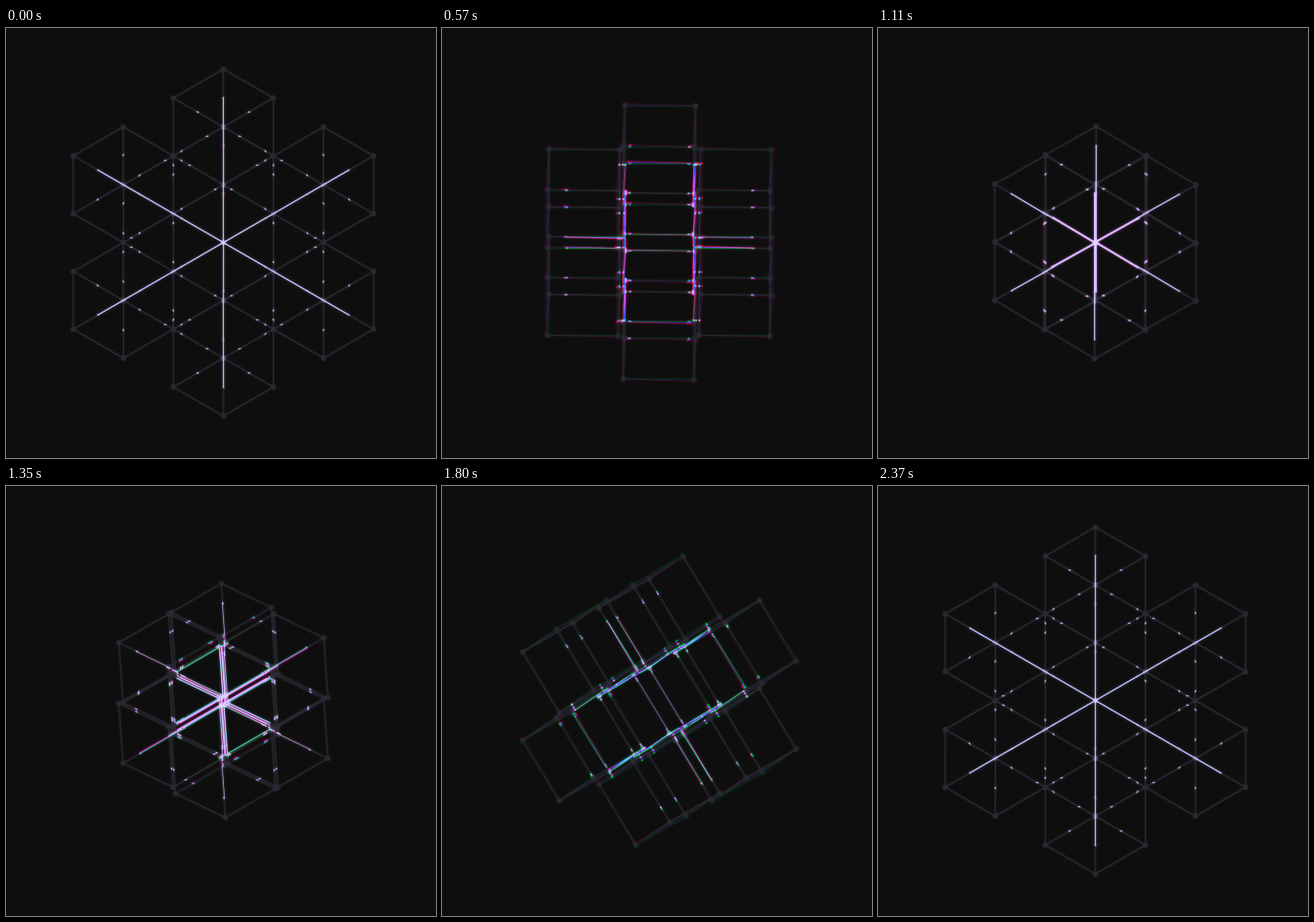
These frames come from a looping animation (450x450 px, 2400 ms). An HTML page with a canvas:

```html
<!DOCTYPE html>
<html lang="en">
<head>
<meta charset="utf-8">
<title>Seven cubes</title>
<style>
  html, body { margin: 0; width: 100%; height: 100%; overflow: hidden; background: #0e0e0e; }
  canvas { display: block; width: 450px; height: 450px; }
</style>
</head>
<body>
<canvas id="stage" width="450" height="450"></canvas>
<script>
const canvas = document.getElementById('stage');
const ctx = canvas.getContext('2d');

const SIZE = 450;
const LOOP = 2400;
const HALF = LOOP / 2;
const CENTER = { x: 227.5, y: 224.5 };
const EDGE = 74.1;
const TILT = Math.asin(1 / Math.sqrt(3));
const BACKGROUND = '#0e0e0e';
const ECHO_SCALE = 0.838;
const SHUTTER = 15; // middle of a 30 ms exposure

// Each colour channel sees the scene at a slightly different moment.
const CHANNELS = [
  { lag: -9, wire: 21, color: v => `rgb(${v}, 0, 0)` },
  { lag: 9, wire: 20, color: v => `rgb(0, ${v}, 0)` },
  { lag: 0, wire: 27, color: v => `rgb(0, 0, ${v})` }
];

const smoothstep = u => u * u * (3 - 2 * u);

// Projected corners of one cube: four on the top face, four below.
function cubeCorners(turn, roll) {
  const radius = EDGE / Math.SQRT2;
  const halfHeight = EDGE * Math.cos(TILT) / 2;
  const cos = Math.cos(roll), sin = Math.sin(roll);
  return Array.from({ length: 8 }, (_, i) => {
    const angle = (i % 4) * Math.PI / 2 - turn;
    const x = radius * Math.sin(angle);
    const y = (i < 4 ? -halfHeight : halfHeight) - radius * Math.sin(TILT) * Math.cos(angle);
    return { x: x * cos - y * sin, y: x * sin + y * cos };
  });
}

function cubeCenters(distance) {
  const ring = Array.from({ length: 6 }, (_, i) => {
    const angle = Math.PI / 6 + i * Math.PI / 3;
    return { x: distance * Math.cos(angle), y: distance * Math.sin(angle) };
  });
  return [{ x: 0, y: 0 }, ...ring];
}

function cubesAt(time) {
  const t = ((time % LOOP) + LOOP) % LOOP;
  const turn = smoothstep((t % HALF) / HALF) * Math.PI / 2;
  const roll = t < HALF ? 0 : Math.PI / 3;
  const distance = 90.75 + 30.25 * Math.cos(2 * Math.PI * t / LOOP);
  const corners = cubeCorners(turn, roll);
  return cubeCenters(distance).map(c =>
    corners.map(p => ({ x: c.x + p.x, y: c.y + p.y })));
}

function wirePath(cubes, scale) {
  const path = new Path2D();
  const line = (a, b) => {
    path.moveTo(CENTER.x + a.x * scale, CENTER.y + a.y * scale);
    path.lineTo(CENTER.x + b.x * scale, CENTER.y + b.y * scale);
  };
  for (const p of cubes) {
    for (let i = 0; i < 4; i++) {
      const next = (i + 1) % 4;
      line(p[i], p[next]);
      line(p[i + 4], p[next + 4]);
      line(p[i], p[i + 4]);
    }
  }
  return path;
}

function dotPath(cubes) {
  const path = new Path2D();
  for (const p of cubes.flat()) {
    const x = CENTER.x + p.x, y = CENTER.y + p.y;
    path.moveTo(x + 2.8, y);
    path.arc(x, y, 2.8, 0, 2 * Math.PI);
  }
  return path;
}

function stroke(path, color, width) {
  ctx.strokeStyle = color;
  ctx.lineWidth = width;
  ctx.stroke(path);
}

// The smaller echo is invisible by itself; it only lights up the wires it covers.
function drawChannel(time, { lag, wire, color }) {
  const cubes = cubesAt(time + lag);
  ctx.globalCompositeOperation = 'lighten';
  stroke(wirePath(cubes, 1), color(wire), 1.6);
  ctx.fillStyle = color(wire);
  ctx.fill(dotPath(cubes));

  const echo = wirePath(cubes, ECHO_SCALE);
  ctx.globalCompositeOperation = 'color-dodge';
  stroke(echo, color(85), 4);
  stroke(echo, color(202), 1.7);
}

function drawGlow() {
  ctx.globalCompositeOperation = 'lighter';
  ctx.globalAlpha = 0.4;
  ctx.filter = 'blur(1.8px)';
  ctx.drawImage(canvas, 0, 0);
  ctx.filter = 'none';
  ctx.globalAlpha = 1;
}

function draw(time) {
  ctx.globalCompositeOperation = 'source-over';
  ctx.fillStyle = '#000';
  ctx.fillRect(0, 0, SIZE, SIZE);
  for (const channel of CHANNELS) drawChannel(time + SHUTTER, channel);
  drawGlow();
  ctx.fillStyle = BACKGROUND;
  ctx.fillRect(0, 0, SIZE, SIZE);
}

const start = performance.now();
function tick() {
  draw(performance.now() - start);
  requestAnimationFrame(tick);
}
tick();
</script>
</body>
</html>
```
